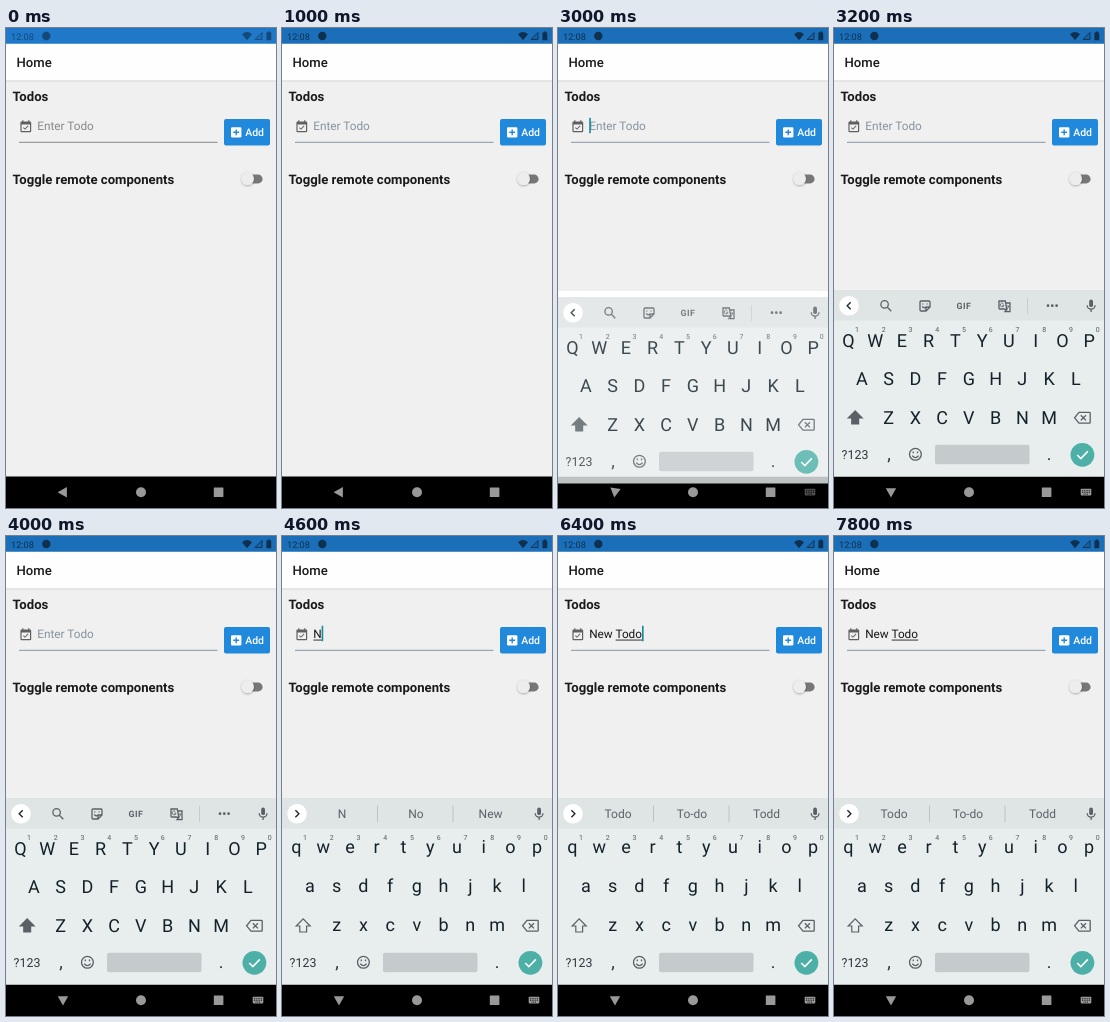
Recreate the animation shown at these times as an HTML page. Size 270 px wide and 480 px high, loop 8 s.

```html
<!DOCTYPE html>
<html lang="en">
<head>
<meta charset="utf-8">
<title>Todo entry</title>
<style>
html, body { margin: 0; width: 100%; height: 100%; overflow: hidden; background: #f0f0f0; }
svg { display: block; width: 270px; height: 480px; font-family: Roboto, "Noto Sans", sans-serif; }
text { white-space: pre; text-rendering: geometricPrecision; }
.mid { text-anchor: middle; }
.line { fill: none; stroke: #596166; stroke-width: 1.3; }
</style>
</head>
<body>
<svg viewBox="0 0 270 480">
  <defs>
    <linearGradient id="shade" x2="0" y2="1">
      <stop stop-color="#cfcfcf"/><stop offset="1" stop-color="#f0f0f0"/>
    </linearGradient>
    <filter id="soft" x="-50%" y="-50%" width="200%" height="200%">
      <feDropShadow dx="0" dy=".7" stdDeviation=".8" flood-opacity=".35"/>
    </filter>
  </defs>

  <rect width="270" height="480" fill="#f0f0f0"/>
  <rect y="52" width="270" height="2.5" fill="url(#shade)"/>
  <rect width="270" height="52.4" fill="#fefefe"/>
  <rect id="bar" width="270" height="15.75"/>
  <g id="status" fill="#10304f">
    <text x="5" y="11.5" font-size="9.2">12:08</text>
    <circle cx="40.3" cy="8" r="4.2"/>
    <path d="M236 6.2Q241 2 246 6.2L241 12.2Z"/>
    <path d="M256 4.5V11.5H249Z" fill-opacity=".2" stroke="#10304f" stroke-width=".9"/>
    <path d="M260.4 4.4h1.3v-1h2.2v1h1.3V12.2h-4.8Z"/>
  </g>

  <g fill="#1a1a1a" font-size="13.125">
    <text x="10.5" y="39" font-weight="500">Home</text>
    <g font-weight="700">
      <text x="6.56" y="73">Todos</text>
      <text x="6.56" y="155.8">Toggle remote components</text>
    </g>
  </g>

  <path transform="translate(12.6 91.6) scale(.6)" fill="#606060" fill-rule="evenodd"
    d="M16.5 11 15.4 10l-4.8 4.9-2.1-2.1-1.1 1 3.2 3.2ZM19 3h-1V1h-2v2H8V1H6v2H5Q3 3 3 5V19q0 2 2 2H19q2 0 2-2V5q0-2-2-2ZM19 19H5V8H19Z"/>
  <text id="hint" x="31.2" y="102.4" font-size="11.81">Enter Todo</text>
  <text id="entry" x="31.2" y="102.4" font-size="11.81" fill="#151515"></text>
  <rect id="mark" y="103.6" height=".9" fill="#222"/>
  <rect id="caret" y="89.8" width="1.6" height="15.4" fill="#168a99"/>
  <rect id="rule" x="13" y="113.8" width="198.5" height="1"/>

  <rect x="218" y="91" width="46" height="26.5" rx="2" fill="#2089dc"/>
  <rect x="225" y="99.2" width="10.4" height="10.2" rx="1.2" fill="#fff"/>
  <path d="M230.2 101.4v5.8M227.3 104.3h5.8" stroke="#2089dc" stroke-width="1.4"/>
  <text x="239.2" y="108.1" font-size="10.5" font-weight="500" fill="#fff">Add</text>

  <rect x="238" y="146.6" width="18.6" height="8.8" rx="4.4" fill="#777"/>
  <circle cx="241.7" cy="150.8" r="6.3" fill="#ededed" filter="url(#soft)"/>

  <rect y="448.5" width="270" height="31.5" fill="#000"/>
  <rect id="sheet" y="263" width="270" height="185.5" fill="#fff"/>
  <g id="board">
    <rect y="262" width="270" height="186.5" fill="#e8eded"/>
    <rect y="262" width="270" height="30.5" fill="#dfe4e5"/>
    <circle cx="15" cy="277.7" r="9.8" fill="#fff"/>
    <path id="chevron" fill="none" stroke="#22292d" stroke-width="1.4"/>
    <g id="tools" class="line">
      <circle cx="50.6" cy="276.4" r="3.7"/><path d="M53.4 279.2 57.3 283.2"/>
      <path d="M87 273h8q1 0 1 1v5l-4 4h-5q-1 0-1-1v-8q0-1 1-1ZM96 279h-3q-1 0-1 1v3"/>
      <path d="M88.2 278.4q2 2.6 4 .4M88.8 275.5v1M93 275.5v1"/>
      <text class="mid" x="130" y="281" font-size="8.8" font-weight="700" fill="#596166" stroke="none" letter-spacing=".5">GIF</text>
      <path d="M169.5 281H165.8q-.8 0-.8-.8V273h6.3l1.5 8.5ZM172 275h4v8.6h-5l1.8-2.1"/>
      <path d="M170 277.2h-1.7M170 277.2a1.9 1.9 0 1 1-.7-1.8M172.3 278h3M174.7 278q-.6 2-2 3" stroke-width=".9"/>
      <path d="M193.5 270v16" stroke="#c6cccf" stroke-width="1"/>
      <path d="M214 277.7h.01M218.3 277.7h.01M222.6 277.7h.01" stroke-width="2.7" stroke-linecap="round"/>
    </g>
    <g id="words" font-size="12" fill="#596368">
      <path d="M95.5 269.5v16.5M171 269.5v16.5" stroke="#bcc3c6"/>
    </g>
    <rect x="255.2" y="271.5" width="3.8" height="7.6" rx="1.9" fill="#596166"/>
    <path class="line" d="M253.2 277.3a3.9 3.9 0 0 0 7.8 0M257.1 281.2V284"/>
    <g id="keys" class="mid" font-size="18" fill="#13222a"></g>
    <path id="shift" d="M21.2 382.8 28.2 390H24.6v6H17.8v-6H14.2Z" stroke="#596166" stroke-width="1.2"/>
    <path class="line" d="M245 384.4h10.4q.8 0 .8.8v9.2q0 .8-.8.8H245l-4.4-5.4ZM246.8 387.2l5.2 5.2M252 387.2l-5.2 5.2"/>
    <g fill="#2a363c">
      <text x="7.6" y="430.8" font-size="12.4">?123</text>
      <text class="mid" x="55" y="431.5" font-size="18">,</text>
      <text class="mid" x="215" y="431.5" font-size="18">.</text>
    </g>
    <circle class="line" cx="81.4" cy="426.3" r="5.9"/>
    <path class="line" d="M78.2 427.6q3.2 4 6.4 0M79.3 423.6v1.6M83.5 423.6v1.6"/>
    <rect x="101" y="416.7" width="94.5" height="19.6" rx="2" fill="#c5cacc"/>
    <circle cx="248.4" cy="426.8" r="11.9" fill="#4db0a7"/>
    <path d="M243.2 427l3.6 3.6 7-7.2" fill="none" stroke="#fff" stroke-width="1.6"/>
  </g>

  <g fill="#999">
    <path id="back" d="M51.6 464.2 60.9 459v10.4Z"/>
    <circle cx="135" cy="464.2" r="5"/>
    <rect x="207.8" y="459.5" width="9.6" height="9.6" rx=".5"/>
    <g id="picker">
      <rect x="246.7" y="460.8" width="10.6" height="6.6" rx=".8"/>
      <path d="M248 462.7h8M248 464.3h8M249.5 466.1h5" stroke="#000" stroke-width=".8" stroke-dasharray="1 .75"/>
    </g>
  </g>
</svg>
<script>
const LOOP = 8000, OPEN = 3000, SETTLED = 3200;

// time, text, start of the underlined word, suggestions
const typing = [
  [0, "", 0, ""],
  [4400, "N", 0, "N No New"],
  [4800, "Ne", 0, "Ne New Need"],
  [5200, "New", 0, "New News Now"],
  [5600, "New ", 4, "one to and"],
  [5800, "New T", 4, "T The To"],
  [6000, "New To", 4, "To Too Today"],
  [6200, "New Tod", 4, "Tod Today Todd"],
  [6400, "New Todo", 4, "Todo To-do Todd"]
];
const caretOn = [[3000, 3200], [3600, 4000], [4200, 6550], [7050, 7550]];

const $ = id => document.getElementById(id);
const set = (id, attrs) => {
  for (const name in attrs) $(id).setAttribute(name, attrs[name]);
};
const show = (id, on) => { $(id).style.display = on ? "" : "none"; };

function label(parent, x, y, text, size) {
  const el = document.createElementNS("http://www.w3.org/2000/svg", "text");
  el.setAttribute("x", x);
  el.setAttribute("y", y);
  el.setAttribute("class", "mid");
  if (size) el.setAttribute("font-size", size);
  el.textContent = text;
  $(parent).append(el);
  return el;
}

const keys = [];
[["QWERTYUIOP", 14.4, 318.5], ["ASDFGHJKL", 27.8, 357.3], ["ZXCVBNM", 54.6, 396.2]]
  .forEach(([row, left, y], r) => [...row].forEach((letter, i) => {
    const x = left + i * 26.75;
    keys.push({ el: label("keys", x, y, letter), letter, y });
    if (!r) label("keys", x + 8.6, 303.8, (i + 1) % 10, 7).setAttribute("fill", "#535c61");
  }));
const words = [60, 134, 208.6].map(x => label("words", x, 282.2, ""));

function drawBoard(moving, text, hints) {
  const upper = !text;
  set("board", { transform: `translate(0 ${moving ? 7 : 0})`, opacity: moving ? 0.82 : 1 });
  for (const { el, letter, y } of keys) {
    el.textContent = upper ? letter : letter.toLowerCase();
    el.setAttribute("y", upper ? y : y - 1.2);
  }
  set("shift", { fill: upper ? "#596166" : "none" });
  set("chevron", { d: upper ? "M16.7 274.2 13.2 277.7l3.5 3.5" : "M13.4 274.2l3.5 3.5-3.5 3.5" });
  show("tools", upper);
  show("words", !upper);
  hints.split(" ").forEach((word, i) => { words[i].textContent = word; });
}

function draw(t) {
  const [, text, from, hints] = typing.filter(step => step[0] <= t).pop();
  const open = t >= OPEN, moving = open && t < SETTLED, fresh = t < 200;

  set("bar", { fill: fresh ? "#1f78c8" : "#1a6fb8" });
  set("status", { opacity: fresh ? 0.65 : 1 });
  set("hint", { fill: fresh ? "#888" : "#86939e" });
  set("rule", { fill: fresh ? "#888" : "#8797a6" });

  show("hint", !text);
  const entry = $("entry");
  entry.textContent = text;
  const width = n => n ? entry.getSubStringLength(0, n) : 0;
  const end = width(text.length), start = width(from);
  set("mark", { x: 31.4 + start, width: Math.max(0, end - start) });
  set("caret", { x: 31.2 + end });
  show("caret", caretOn.some(([a, b]) => t >= a && t < b));

  show("board", open);
  show("sheet", moving);
  show("picker", open);
  set("picker", { opacity: moving ? 0.5 : 1 });
  set("back", { transform: `rotate(${moving ? -82 : open ? -90 : 0} 57 464.2)` });
  if (open) drawBoard(moving, text, hints);
}

function tick() {
  draw(performance.now() % LOOP);
  requestAnimationFrame(tick);
}
tick();
</script>
</body>
</html>
```
